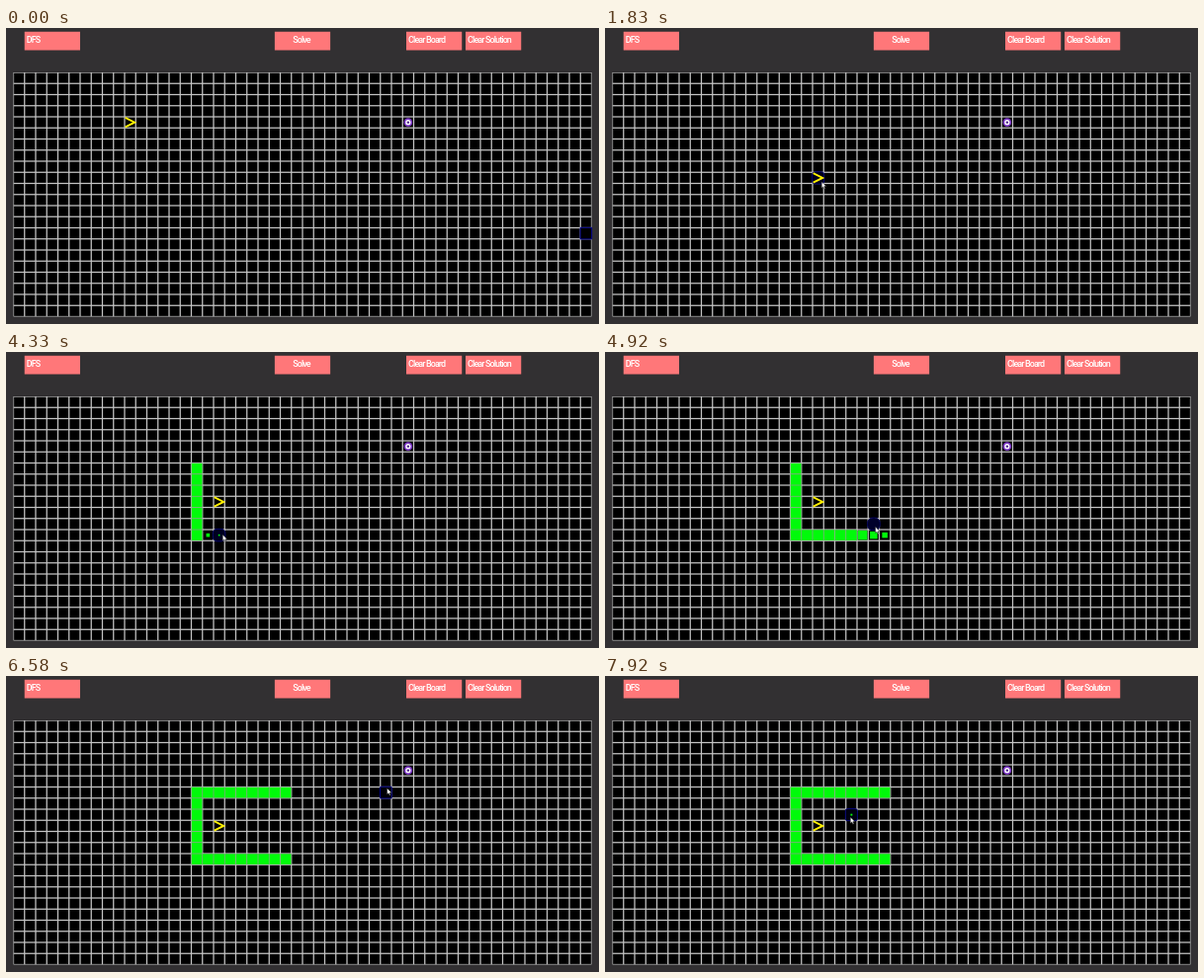
These frames come from a looping animation (600x300 px, 8000 ms). An HTML page with a canvas:

```html
<!DOCTYPE html>
<html lang="en">
<head>
<meta charset="utf-8">
<title>Pathfinding board</title>
<style>
  html, body { margin: 0; width: 100%; height: 100%; overflow: hidden; background: #323032; }
  canvas { display: block; width: 600px; height: 300px; }
</style>
</head>
<body>
<canvas id="board" width="600" height="300"></canvas>
<script>
const ctx = document.getElementById('board').getContext('2d');
const LOOP = 8000, COLS = 52, ROWS = 22, CELL = 11.25, LEFT = 7.5, TOP = 45;
const GROW = 420, HOVER = 180, BUTTON = 5 * CELL;
const DRAG_START = 930, DRAG_END = 1840;

const clamp = (v, lo, hi) => Math.max(lo, Math.min(hi, v));
const mix = (a, b, k) => a + (b - a) * k;
const toX = col => LEFT + col * CELL;
const toY = row => TOP + row * CELL;

// Pointer moves in grid units; each leg begins where and when the last one ended
const legs = [];
let pen = { time: 80, col: 52.8, row: 14.3 };
function moveTo(time, col, row, draws = false) {
  const next = { time, col, row };
  legs.push({ from: pen, to: next, draws });
  pen = next;
}
const wait = time => moveTo(time, pen.col, pen.row);
const drawTo = (time, col, row) => moveTo(time, col, row, true);

moveTo(850, 10.6, 4.7);
wait(DRAG_START);
moveTo(DRAG_END, 18.9, 9.9);
wait(2120);
moveTo(2714, 16.2, 6.2);
drawTo(3372, 16.2, 12.45);
wait(4137);
drawTo(4759, 24.6, 12.45);
wait(4850);
moveTo(5467, 16.3, 6.3);
drawTo(6095, 24.6, 6.3);
moveTo(6440, 33.6, 6.1);
wait(6800);
moveTo(7850, 21.4, 8.7);
drawTo(LOOP, 21.4, 8.7);

// Every cell a drawing leg passes, with the time it is entered
const walls = legs.filter(leg => leg.draws).flatMap(({ from, to }) => {
  const length = Math.max(to.col - from.col, to.row - from.row);
  const dx = Math.sign(to.col - from.col), dy = Math.sign(to.row - from.row);
  const col = Math.floor(from.col), row = Math.floor(from.row);
  const count = Math.floor(to.col) - col + Math.floor(to.row) - row + 1;
  const inset = dx ? from.col - col : from.row - row;
  return Array.from({ length: count }, (_, i) => ({
    col: col + i * dx,
    row: row + i * dy,
    born: i ? mix(from.time, to.time, (i - inset) / length) : from.time
  }));
});

function pointerAt(t) {
  const { from, to } = legs.find(leg => t <= leg.to.time) || legs[legs.length - 1];
  const k = clamp((t - from.time) / (to.time - from.time), 0, 1);
  return [mix(from.col, to.col, k), mix(from.row, to.row, k)];
}

function cellAt(t) {
  const [col, row] = pointerAt(t).map(Math.floor);
  return [clamp(col, 0, COLS - 1), clamp(row, 0, ROWS - 1)];
}

const centerOf = ([col, row]) => [toX(col + 0.5), toY(row + 0.5)];

function hoverAge(t) {
  const cell = String(cellAt(t));
  let age = 0;
  while (age < HOVER && String(cellAt(t - age - 5)) === cell) age += 5;
  return age;
}

function square(x, y, size, color) {
  ctx.fillStyle = color;
  ctx.fillRect(x - size / 2, y - size / 2, size, size);
}

function disc(x, y, r, color) {
  ctx.fillStyle = color;
  ctx.beginPath();
  ctx.arc(x, y, r, 0, Math.PI * 2);
  ctx.fill();
}

function drawButton(x, label, centered) {
  ctx.fillStyle = '#ff7779';
  ctx.fillRect(x, 3.75, BUTTON, 18.75);
  ctx.fillStyle = '#fff';
  ctx.textAlign = centered ? 'center' : 'left';
  ctx.fillText(label, centered ? x + BUTTON / 2 - 1 : x + 2, 12.5);
}

function drawButtons() {
  ctx.font = '500 9px Roboto, "Liberation Sans", sans-serif';
  ctx.letterSpacing = '-0.9px';
  ctx.textBaseline = 'middle';
  drawButton(18.75, 'DFS');
  drawButton(300 - BUTTON / 2, 'Solve', true);
  drawButton(405, 'Clear Board');
  drawButton(465, 'Clear Solution');
}

function drawGrid() {
  const width = COLS * CELL, height = ROWS * CELL, line = 1.25;
  ctx.save();
  ctx.beginPath();
  ctx.rect(LEFT, TOP, width, height);
  ctx.clip();
  ctx.fillStyle = '#000';
  ctx.fillRect(LEFT, TOP, width, height);
  ctx.fillStyle = '#c4c4c4';
  for (let c = 0; c <= COLS; c++) ctx.fillRect(toX(c) - line / 2, TOP, line, height);
  for (let r = 0; r <= ROWS; r++) ctx.fillRect(LEFT, toY(r) - line / 2, width, line);
  ctx.restore();
}

function drawHover(t) {
  const [x, y] = centerOf(cellAt(t));
  const k = hoverAge(t) / HOVER;
  const half = mix(6.5, 5.8, k);
  ctx.beginPath();
  ctx.roundRect(x - half, y - half, half * 2, half * 2, half * (1 - k));
  ctx.fillStyle = `rgb(0, 0, ${mix(50, 0, k)})`;
  ctx.fill();
  ctx.strokeStyle = `rgb(0, 0, ${mix(80, 140, k)})`;
  ctx.lineWidth = 1;
  ctx.stroke();
}

function drawWalls(t) {
  for (const { col, row, born } of walls) {
    const k = clamp((t - born) / GROW, 0, 1);
    const [x, y] = centerOf([col, row]);
    if (k === 1) square(x, y, CELL, '#7fa57f');
    square(x, y, Math.min(k * CELL, CELL - 0.8), '#00fa0a');
  }
}

function drawStart(t) {
  const [x, y] = centerOf(cellAt(clamp(t, DRAG_START, DRAG_END)));
  ctx.strokeStyle = '#fff200';
  ctx.lineWidth = 1.8;
  ctx.beginPath();
  ctx.moveTo(x - 5, y - 4.7);
  ctx.lineTo(x + 4.6, y);
  ctx.lineTo(x - 5, y + 4.7);
  ctx.stroke();
}

function drawGoal() {
  const [x, y] = centerOf([35, 4]);
  disc(x, y, 4.3, '#7a35c4');
  disc(x, y, 2.6, '#fff');
  disc(x, y, 1.2, '#4a2088');
}

function drawPointer(t) {
  const [col, row] = pointerAt(t);
  ctx.save();
  ctx.translate(toX(col), toY(row));
  ctx.fillStyle = '#fff';
  ctx.strokeStyle = '#111';
  ctx.lineWidth = 0.5;
  const arrow = new Path2D('M0 0V6.4L1.5 5.1 2.6 7.4 3.6 6.9 2.6 4.8 4.6 4.6Z');
  ctx.fill(arrow);
  ctx.stroke(arrow);
  ctx.restore();
}

function draw(t) {
  ctx.fillStyle = '#323032';
  ctx.fillRect(0, 0, 600, 300);
  drawButtons();
  drawGrid();
  drawHover(t);
  drawWalls(t);
  drawStart(t);
  drawGoal();
  drawPointer(t);
}

const began = performance.now();
function tick() {
  draw((performance.now() - began) % LOOP);
  requestAnimationFrame(tick);
}
tick();
</script>
</body>
</html>
```
